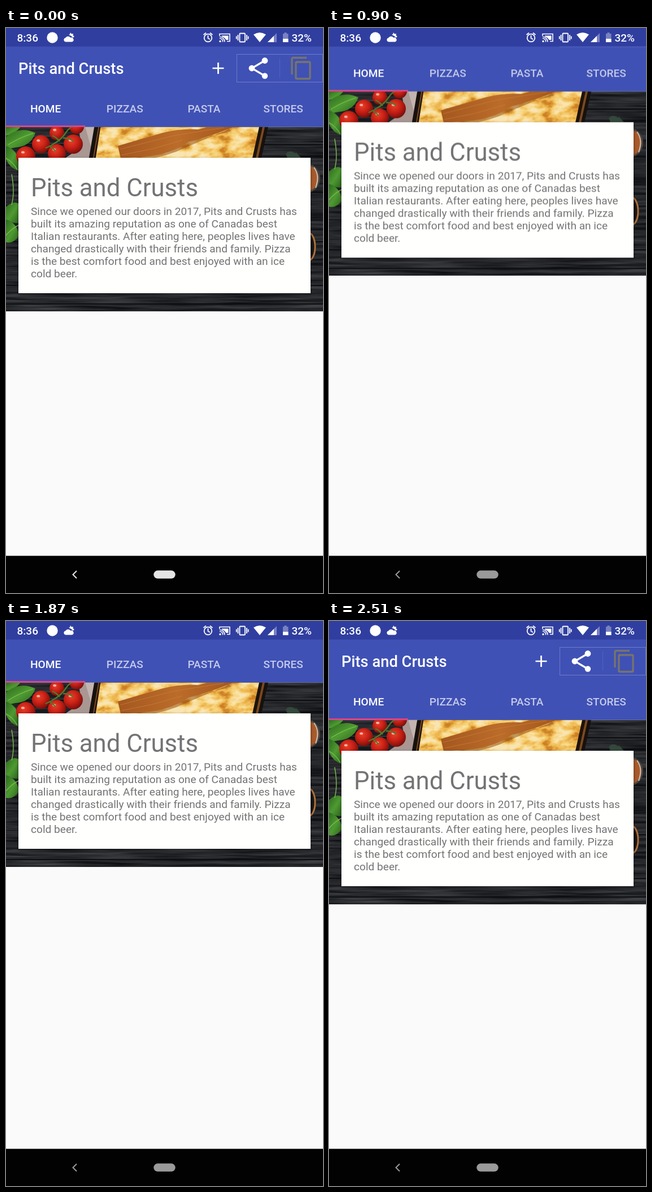
An HTML page for the animation above (2700 ms loop, 561 by 997 pixels).

```html
<!DOCTYPE html>
<html lang="en">
<head>
<meta charset="utf-8">
<title>Pits and Crusts</title>
<style>
  html, body { margin: 0; width: 100%; height: 100%; overflow: hidden; background: #fafafa; }
  svg { display: block; width: 561px; height: 997px; font-family: Roboto, sans-serif; }
  .bold { font-weight: 500; fill: #fff; }
  .tab { font-size: 19.1px; text-anchor: middle; }
  .dim { fill: #c5cae9; }
  .grey { fill: #737375; }
  .line { fill: none; stroke: #fff; }
</style>
</head>
<body>
<svg viewBox="0 0 561 997">
  <defs>
    <radialGradient id="red" cx=".4" cy=".35" r=".7">
      <stop offset="0" stop-color="#e8402a"/>
      <stop offset=".5" stop-color="#c71f14"/>
      <stop offset="1" stop-color="#6e0d0b"/>
    </radialGradient>
    <linearGradient id="leaf" x2="1" y2="1">
      <stop offset="0" stop-color="#2c6b1c"/>
      <stop offset=".5" stop-color="#4f9a32"/>
      <stop offset="1" stop-color="#2a611b"/>
    </linearGradient>
    <linearGradient id="spoon" x2="1">
      <stop offset="0" stop-color="#a4571f"/>
      <stop offset=".5" stop-color="#bb6c2a"/>
      <stop offset="1" stop-color="#a3571d"/>
    </linearGradient>
    <filter id="soft" x="-20%" y="-20%" width="140%" height="140%"><feGaussianBlur stdDeviation="2.5"/></filter>
    <filter id="wood" x="0" y="0" width="1" height="1" color-interpolation-filters="sRGB">
      <feTurbulence type="fractalNoise" baseFrequency=".008 .2" numOctaves="3" seed="4"/>
      <feColorMatrix values=".32 0 0 0 -.01  .32 0 0 0 -.005  .32 0 0 0 .01  0 0 0 0 1"/>
    </filter>
    <filter id="cheese" x="0" y="0" width="1" height="1" color-interpolation-filters="sRGB">
      <feTurbulence type="fractalNoise" baseFrequency=".035 .06" numOctaves="4" seed="9"/>
      <feColorMatrix values="2.4 0 0 0 -.65  2.4 0 0 0 -.65  2.4 0 0 0 -.65  0 0 0 0 1"/>
      <feComponentTransfer>
        <feFuncR type="table" tableValues=".80 .93 .97 .98"/>
        <feFuncG type="table" tableValues=".50 .71 .83 .90"/>
        <feFuncB type="table" tableValues=".14 .30 .49 .70"/>
      </feComponentTransfer>
      <feComposite in2="SourceGraphic" operator="in"/>
    </filter>
    <clipPath id="photo"><rect y="174.5" width="561" height="325.5"/></clipPath>
  </defs>

  <rect width="561" height="997" fill="#fafafa"/>

  <g id="page">
    <g clip-path="url(#photo)">
      <rect y="174" width="561" height="326" filter="url(#wood)"/>
      <path d="M0 206H561M0 290H561M0 377H561M0 454H561M0 487H561" stroke="#0d0e11" stroke-width="2"/>

      <!-- basil -->
      <g fill="url(#leaf)">
        <path d="M0 174H26Q16 188 0 190Z"/>
        <path d="M0 192Q24 172 52 185Q44 209 16 211L0 214Z"/>
        <path d="M0 208Q18 214 23 234L22 252Q8 248 0 232Z"/>
        <path d="M0 316Q14 303 24 311V344Q10 345 0 338Z"/>
        <path d="M0 338Q18 342 24 366Q12 382 0 378Z"/>
        <path d="M4 206Q24 193 48 186M0 230Q12 236 20 250M0 366Q10 354 22 348M10 258Q16 290 10 312"
              fill="none" stroke="#73b94a" stroke-width="1.5"/>
      </g>

      <!-- cloth, tray -->
      <path d="M128 174H158L149 230H104L134 210Z" fill="#a89793"/>
      <path d="M140 174H158L152 216Z" fill="#c3b4af"/>
      <path d="M157 170H465L451 234H146Z" fill="#17110e"/>
      <path d="M164 170H459L445 234H153Z" fill="#7b4a20"/>
      <path d="M166 170H455L441 234H155Z" fill="#1d130d"/>
      <path d="M168 170H449L435 234H158Z" filter="url(#cheese)"/>
      <path d="M203 219L300 206L399 182L395 178L318 211Q288 225 255 231L204 234Z" fill="#8b4a18" opacity=".5"/>
      <path d="M198 208L277 185Q310 177 340 179L366 172H408Q365 191 323 201Q296 220 256 226L203 230Z" fill="url(#spoon)"/>
      <path d="M202 214L292 191Q330 184 385 176M205 224L260 213L312 198" fill="none" stroke="#cd8540" opacity=".6"/>

      <g id="tomatoes"></g>
      <path d="M70 212Q95 201 105 186T122 175M95 200Q88 192 82 190M101 194Q113 194 119 200M78 209L88 217"
            fill="none" stroke="#55772b" stroke-width="2.4"/>

      <!-- herbs, jar, ring -->
      <path d="M495 222Q505 211 520 229H498ZM508 229L513 219L522 229Z" fill="#34483b"/>
      <circle cx="529" cy="265" r="27" fill="#4a4643"/>
      <circle cx="529" cy="265" r="24" fill="#a95a2a"/>
      <path d="M545 246Q556 260 548 282" fill="none" stroke="#c9c0b5" stroke-width="2"/>
      <ellipse cx="536" cy="386" rx="11" ry="24" fill="#1a1613" stroke="#ae713a" stroke-width="3"/>
    </g>

    <rect x="22" y="231" width="517" height="239" fill="#000" opacity=".5" filter="url(#soft)"/>
    <rect x="22" y="229" width="517" height="239" fill="#fffffd"/>
    <text class="grey" x="44" y="297.3" font-size="43.7">Pits and Crusts</text>
    <g class="grey" id="story" font-size="19.1"></g>

    <!-- app bar -->
    <rect y="-50" width="561" height="224.5" fill="#3f51b5"/>
    <text class="bold" x="22" y="81" font-size="27.3">Pits and Crusts</text>
    <path class="line" d="M365.5 71H385.5M375.5 61V81" stroke-width="2.7"/>
    <g class="line" stroke-opacity=".25">
      <rect x="408.5" y="46.5" width="152" height="49"/>
      <path d="M484.5 53V88" stroke-opacity=".1"/>
    </g>
    <path class="line" d="M458 57.5L435 71L458 84.5" stroke-width="3.2"/>
    <g fill="#fff">
      <circle cx="458" cy="57.5" r="5.4"/>
      <circle cx="435" cy="71" r="5.4"/>
      <circle cx="458" cy="84.5" r="5.2"/>
    </g>
    <g fill="none" stroke="#77746c" stroke-width="3.3">
      <path d="M506 82V55Q506 52.5 508.5 52.5H532"/>
      <rect x="513" y="60" width="25" height="29.5" rx="1.5"/>
    </g>
    <g id="tabs"></g>
    <rect y="172" width="140" height="2.5" fill="#f0407f"/>
  </g>

  <!-- status bar -->
  <rect width="561" height="32.7" fill="#303f9f"/>
  <g class="bold" font-size="19">
    <text x="19.5" y="23.5">8:36</text>
    <text x="505.5" y="23.5">32%</text>
  </g>
  <g fill="#fff">
    <circle cx="82" cy="17" r="9.7"/>
    <path d="M105.5 24.5A3.7 3.7 0 0 1 105.5 17.2A5 5 0 0 1 114 17A3.8 3.8 0 0 1 117 24.5Z"/>
    <path d="M111 12L113 11L114 8L116 10.5L119 10L118.5 13L121 15L118.5 17Q116 13.5 111 12Z"/>
    <path d="M438 11.5Q449 4.5 460 11.5L449 25Z"/>
    <path d="M463 25L479 9V25Z" opacity=".35"/>
    <path d="M463 25L474 14V25Z"/>
    <path d="M490 10H492.5V8H496.5V10H499.5V25H490Z" opacity=".35"/>
    <rect x="490" y="19" width="9.5" height="6"/>
    <path d="M382 13.5H393.5V21H389.5Q387 16.5 382 15Z"/>
    <circle cx="379" cy="23.5" r="1.7"/>
  </g>
  <g class="line" stroke-width="1.8">
    <circle cx="357.5" cy="17.5" r="6.8"/>
    <path d="M357.5 13V18L361 20M349.5 12L354 8.5M365.5 12L361 8.5"/>
    <path d="M378 14V10.5H396V23.5H391M378 18.5A5 5 0 0 1 383.5 24.5M378 15.5A9 9 0 0 1 387 24.5" stroke-width="1.6"/>
    <rect x="413.5" y="9.5" width="9.5" height="15" rx="1"/>
    <path d="M410.5 12V22M426 12V22M407.8 14.5V19.5M428.7 14.5V19.5"/>
  </g>

  <!-- navigation bar -->
  <rect y="931.4" width="561" height="66" fill="#020203"/>
  <g id="nav">
    <path class="line" d="M125 958L118.5 964.5L125 971" stroke-width="2"/>
    <rect x="261.3" y="957.3" width="38.4" height="14.2" rx="7.1" fill="#fff"/>
  </g>
</svg>
<script>
const LOOP = 2700;
const $ = id => document.getElementById(id);

function add(parent, tag, attrs, text) {
  const el = document.createElementNS('http://www.w3.org/2000/svg', tag);
  for (const k in attrs) el.setAttribute(k, attrs[k]);
  if (text) el.textContent = text;
  return parent.appendChild(el);
}

['HOME', 'PIZZAS', 'PASTA', 'STORES'].forEach((name, i) =>
  add($('tabs'), 'text', { class: 'bold tab' + (i ? ' dim' : ''), x: 70.1 + i * 140.2, y: 149.3 }, name));

[
  'Since we opened our doors in 2017, Pits and Crusts has',
  'built its amazing reputation as one of Canadas best',
  'Italian restaurants. After eating here, peoples lives have',
  'changed drastically with their friends and family. Pizza',
  'is the best comfort food and best enjoyed with an ice',
  'cold beer.'
].forEach((line, i) => add($('story'), 'text', { x: 44, y: 329.5 + i * 22.15 }, line));

for (const [x, y, r] of [[90, 185, 13], [125, 174, 13], [62, 205, 16], [35, 226, 17], [90, 221, 16], [119, 205, 17]]) {
  add($('tomatoes'), 'circle', { cx: x, cy: y, r, fill: 'url(#red)' });
  add($('tomatoes'), 'ellipse', { cx: x - r * .3, cy: y - r * .4, rx: 3, ry: 2, fill: '#fbd3c5', opacity: .8 });
}

// scroll poses: start ms, ms per step, offsets
const scroll = [
  [30, 32, [-1, -3, -7, -13, -21, -31, -42, -53, -63, -70, -75, -76.5]],
  [580, 35.5, [-76, -75.5, -75, -74, -73, -72, -70, -68, -66]],
  [900, 32.5, [-62.7, -46, -28, -12, -2]],
  [1190, 30, [-1, 0]],
  [1740, 32, [-1, -8, -24, -46, -66, -76.5]],
  [2290, 31.4, [-74.5, -66, -53, -38, -23, -11, -3, 0]]
];
const pose = (ms, y) => ({ offset: ms / LOOP, transform: `translate(0px, ${y}px)`, easing: 'steps(1, end)' });
const poses = [pose(0, 0),
  ...scroll.flatMap(([start, gap, ys]) => ys.map((y, i) => pose(start + i * gap, y))),
  pose(LOOP, 0)];

const timing = { duration: LOOP, iterations: Infinity };
const moves = [
  $('page').animate(poses, timing),
  $('nav').animate([
    { offset: 0, opacity: .9, easing: 'steps(17, end)' },
    { offset: 540 / LOOP, opacity: .6 },
    { offset: 1, opacity: .6 }
  ], timing)
];
moves.forEach(m => m.startTime = document.timeline.currentTime);
</script>
</body>
</html>
```
